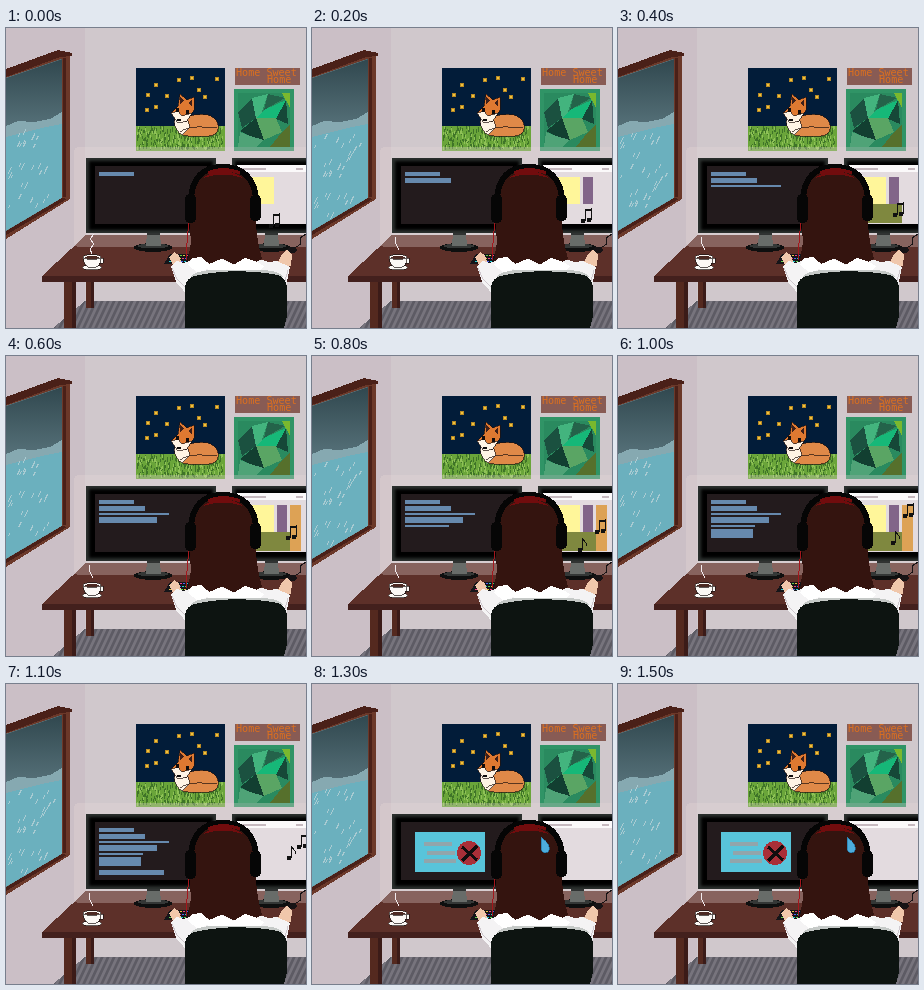
Animation, 300 px wide and 300 px high, one loop 1.52 s. Source, as an HTML page:

```html
<!DOCTYPE html>
<html lang="en">
<head>
<meta charset="utf-8">
<title>Rainy day at the desk</title>
<style>
html, body { margin: 0; width: 100%; height: 100%; overflow: hidden; }
svg { display: block; width: 100vw; height: 100vh; }
text { font: 10.1px "DejaVu Sans Mono", monospace; fill: #dc701f; }
</style>
</head>
<body>
<svg viewBox="0 0 300 300" shape-rendering="crispEdges">
<defs>
  <pattern id="stripes" width="6" height="6" patternUnits="userSpaceOnUse" patternTransform="skewX(-25)">
    <path d="M0 0h6v6H0z" fill="#77747d"/><path d="M0 0h3v6H0z" fill="#5d5b64"/>
  </pattern>
  <linearGradient id="sky" x2="0" y2="1">
    <stop stop-color="#30474e"/><stop offset="1" stop-color="#557078"/>
  </linearGradient>
  <filter id="soft"><feGaussianBlur stdDeviation="1.5"/></filter>
  <clipPath id="glass"><path d="M0 50L56 31V170L0 203z"/></clipPath>
  <g id="monitor">
    <path d="M0 0h130v75H0z" fill="#2b302e"/>
    <path d="M3 3h124v69H3z" fill="#000" filter="url(#soft)"/>
    <path d="M9 8h112v58H9z" fill="#231b1d"/>
  </g>
  <g id="stand">
    <ellipse cx="147" cy="219.500" rx="19" ry="4.500" fill="#0e0f0f"/>
    <ellipse cx="147" cy="218" rx="15" ry="2.500" fill="#343736"/>
    <path d="M141 205h13l1 13h-15z" fill="#686c69"/>
    <path d="M141 205h13v2h-13z" fill="#303332"/>
  </g>
</defs>

<!-- room -->
<path d="M0 0h300v300H0z" fill="#d0c8cc"/>
<path d="M0 0h79v272L47 300H0z" fill="#cbbfc6"/>
<path d="M79 273h221v27H47z" fill="url(#stripes)"/>

<!-- window -->
<path d="M0 41L52 22L66 25L64 29V171L0 211z" fill="#6b3829"/>
<path d="M0 41L52 22L66 25V28L54 29L0 49z" fill="#4a2018"/>
<path d="M57 30h3v139h-3z" fill="#4a2018"/>
<g clip-path="url(#glass)">
  <path d="M0 30h56v174H0z" fill="#6bb0be"/>
  <path d="M0 30h56v66L40 99L20 104L0 109z" fill="#86a9b1"/>
  <path d="M0 30h56v54L44 91L28 94L12 93L0 98z" fill="url(#sky)"/>
  <path id="rain" fill="none" stroke="#a9cbd2"/>
</g>
<path d="M0 203L56 170L61 171L0 207z" fill="#4a2018"/>

<!-- fox picture -->
<path d="M130 40h89v83h-89z" fill="#021c39"/>
<path d="M130 98h89v25h-89z" fill="#6aa53a"/>
<path id="grassDark" stroke="#3f7428"/>
<path id="grassLight" stroke="#8fc257"/>
<g id="flies"></g>
<g stroke="#21130f" stroke-width=".7">
  <path d="M174 98C176 88 190 85 202 87C216 91 215 108 203 108H182C174 108 171 103 174 98z" fill="#df8948"/>
  <path d="M169 88L181 90L184 99L176 107C170 103 167 97 169 88z" fill="#fff4e5"/>
  <path d="M172 78L174 66L181 72L188 69L188 82L181 93L172 94L165 85z" fill="#df7931"/>
  <path d="M165 85L172 83L176 88L186 85L181 93L172 95z" fill="#fff4e5"/>
  <path d="M174 104C184 97 196 99 211 100" fill="none"/>
</g>
<path d="M174 69L178 73L174 76zM186 71V79L183 75z" fill="#402019"/>
<path d="M170 80h3v4h-3zM180 82h3v4h-3zM171 91h4v2h-4z" fill="#100c0d"/>

<!-- sign and poster -->
<path d="M229 40h65v17h-65z" fill="#885b54"/>
<text x="230" y="48">Home Sweet</text><text x="261" y="55">Home</text>
<path d="M228 61h60v62h-60z" fill="#309466"/>
<path d="M232 65h52v54h-52z" fill="#2a8a5f"/>
<path d="M232 84L246 70L250 90L236 100z" fill="#1b5140"/>
<path d="M246 70L262 66L256 84L250 90z" fill="#43b47e"/>
<path d="M262 66L279 70L258 82z" fill="#24634a"/>
<path d="M258 82L280 72L270 91L250 90z" fill="#16b878"/>
<path d="M280 72L282 96L270 91z" fill="#164838"/>
<path d="M234 103L250 90L258 112L244 108z" fill="#123f31"/>
<path d="M250 90H270L276 104L258 112z" fill="#5aa564"/>
<path d="M234 104L244 108L258 112L250 119H232z" fill="#4fa377"/>
<path d="M276 65H284V80z" fill="#7ab82e"/>
<path d="M284 96V119H264L276 104z" fill="#56702c"/>

<!-- desk -->
<path d="M58 252h12v48H58zM80 252h8v28h-8z" fill="#54291f"/>
<path d="M66 252h4v48h-4zM85 252h3v28h-3z" fill="#3b1b18"/>
<path d="M80 207H300V248H36z" fill="#5d3029"/>
<path d="M36 248H300V254H36z" fill="#43201d"/>
<rect x="68" y="119" width="240" height="100" rx="5" fill="#e6d8d8" opacity=".3"/>

<!-- left monitor -->
<use href="#monitor" x="80" y="130"/>
<use href="#stand"/>
<path id="code" fill="#6689ad"/>
<g id="error">
  <path d="M103 148h70v40h-70z" fill="#58c4da"/>
  <path d="M112 158h28v4h-28zM115 167h28v4h-28zM112 175h32v4h-32z" fill="#91a5ab"/>
  <circle cx="157" cy="169" r="12" fill="#a92f38"/>
  <path d="M150 163L165 176M165 162L150 177" stroke="#110d0e" stroke-width="3"/>
</g>

<!-- right monitor -->
<use href="#monitor" x="226" y="130"/>
<use href="#stand" x="118"/>
<path d="M231 137h69v59h-69z" fill="#e3dbdf"/>
<path d="M231 137h69v7h-69z" fill="#fbf9fa"/>
<path d="M234 140h26v2h-26zM290 140h7v2h-7z" fill="#c6b9bf"/>
<g id="art">
  <path d="M250 176h34v19h-34z" fill="#7f883f"/>
  <path d="M245 149h23v27h-23z" fill="#fff69a"/>
  <path d="M271 149h10v27h-10z" fill="#826589"/>
  <path d="M284 149h11v46h-11z" fill="#dda255"/>
</g>
<g id="notes" fill="#111" stroke="#111"></g>

<!-- cup -->
<path id="steam" fill="none" stroke="#f2eaed"/>
<g fill="#fbf8f5" stroke="#1c1513" stroke-width=".7">
  <ellipse cx="86" cy="239.500" rx="10" ry="2.500"/>
  <path d="M94 230h3v5h-4"/>
  <path d="M77 229H95C95 237 91 240 86 240S78 237 77 229z"/>
  <ellipse cx="86" cy="229" rx="9" ry="2.500"/>
</g>
<ellipse cx="86" cy="229.500" rx="7" ry="1.500" fill="#4c2922"/>

<!-- keyboard and mouse -->
<path d="M164 226h20l-3 10h-23z" fill="#151519"/>
<g id="keys"></g>
<path d="M300 206L294 210L295 216L285 222" fill="none" stroke="#171315"/>
<ellipse cx="286" cy="222" rx="5" ry="3" fill="#171315"/>

<!-- person -->
<path d="M163 229l5-5l5 3l2 7l6 8l-10 2zM285 238l1-11l-5-6l-5 5l-6 12z" fill="#f0c7ab"/>
<path d="M165 238L171 233L178 235L190 230H251L262 234L271 233L284 239L281 254L276 270H184L170 254z" fill="#f4f3f4"/>
<path d="M166 240L171 251L180 260M282 242L278 257" fill="none" stroke="#cfc8ce"/>
<path d="M183 190C178 158 193 138 217 138C243 138 255 158 250 192C250 210 254 222 256 231L248 235L239 231L229 237L217 231L204 236L194 229L182 233L185 214z" fill="#34140f"/>
<path d="M186 230l9-1l8 7l12-5l12 6l12-7l12 4l7 4l-6 7l-10-3l-10 5l-9-5l-11 4l-11-5l-9 4l-10-8z" fill="#fff"/>
<path d="M182 194C183 210 179 218 181 232" fill="none" stroke="#a4161c"/>
<path d="M197 150Q217 136 237 150Q217 143 197 150z" fill="#710c0d"/>
<path d="M185 174C185 148 199 139 217 139S250 149 250 174" fill="none" stroke="#050505" stroke-width="6"/>
<path d="M202 145Q217 138 234 145" fill="none" stroke="#710c0d" stroke-width="3"/>
<rect x="179" y="166" width="11" height="29" rx="5" fill="#060606"/>
<rect x="244" y="167" width="11" height="26" rx="5" fill="#060606"/>
<path id="sweat" d="M229 153C234 158 238 160 237 166C235 171 229 169 229 164z" fill="#4daddd" stroke="#237bac" stroke-width=".7"/>
<path d="M184 249Q190 243 204 242H256Q274 243 277 249z" fill="#c5c9c7"/>
<path d="M179 300V261Q179 249 193 247Q230 240 267 246Q281 248 281 261V288L278 300z" fill="#0d1411"/>
</svg>
<script>
const $ = id => document.getElementById(id);
const starts = [0, 200, 400, 600, 800, 900, 1000, 1100, 1300, 1500];
const LOOP = 1520;

function random(seed) {
  return () => (seed = seed * 16807 % 2147483647) / 2147483647;
}

function grass(seed, count) {
  const rnd = random(seed);
  let d = '';
  for (let i = 0; i < count; i++) {
    const x = 131 + Math.floor(rnd() * 86), y = 98 + Math.floor(rnd() * 22);
    d += `M${x} ${y}l1 3`;
  }
  return d;
}

function rainPath(phase) {
  const rnd = random(417);
  let d = '';
  for (let i = 0; i < 34; i++) {
    const x = 4 + rnd() * 46;
    const y = 100 + (rnd() * 90 + phase * 30) % 90;
    const len = 3 + rnd() * 4;
    d += `M${x.toFixed(1)} ${y.toFixed(1)}l${-len / 2} ${len}`;
  }
  return d;
}

const bar = ([y, w, h]) => `M93 ${y}h${w}v${h}h${-w}z`;
const lines = [[144, 35, 4], [150, 46, 5], [157, 70, 2], [161, 58, 6],
               [169, 44, 2], [173, 42, 4], [177, 42, 5], [186, 65, 5]];

// Positions of the first and second note, one per step.
const firstNote = [[268, 192], [274, 187], [280, 181], [285, 176],
                   [288, 170], [289, 162], [290, 154], [296, 157]];
const secondNote = { 4: [269, 188], 5: [272, 185], 6: [276, 181], 7: [284, 168] };

const head = (x, y) => `<ellipse cx="${x}" cy="${y}" rx="2" ry="1.5"/>`;
const note = ([x, y], pair) => `<g transform="translate(${x} ${y})">` + (pair
  ? head(-3, 6) + head(3, 5) + '<path d="M-1 6V-5L5 -6V5M-1 -4L5 -5" fill="none"/>'
  : head(-1, 6) + '<path d="M1 6V-6L5 -1V2" fill="none"/>') + '</g>';

const keyColors = ['#f0418a', '#4f63f2', '#22cdd2', '#5fd04a', '#e8c440'];
const keyRow = shift => Array.from({ length: 18 }, (_, i) => {
  const row = Math.floor(i / 6), x = 165 + i % 6 * 3 - row, y = 227 + row * 3;
  return `<path d="M${x} ${y}h2v1h-2z" fill="${keyColors[(i + shift) % 5]}"/>`;
}).join('');

$('grassDark').setAttribute('d', grass(53, 260));
$('grassLight').setAttribute('d', grass(91, 120));
$('flies').innerHTML = [[150, 57], [161, 68], [142, 67], [150, 79], [141, 82],
  [173, 52], [186, 50], [211, 51], [199, 69], [193, 62]].map(([x, y]) =>
  `<circle cx="${x}" cy="${y}" r="2.5" fill="#b98a25"/><circle cx="${x}" cy="${y}" r="1.4" fill="#f3c23c"/>`
).join('');

function show(step) {
  const failed = step >= 8, drawing = step < 7;
  $('rain').setAttribute('d', rainPath(step % 3));
  $('steam').setAttribute('d', step
    ? 'M83 209L84 216L87 222'
    : 'M88 206L84 211L88 216L84 221L86 226');
  $('code').setAttribute('d', failed ? '' : lines.slice(0, step + 1).map(bar).join(''));
  $('error').style.display = $('sweat').style.display = failed ? '' : 'none';

  // The step at which each part of the drawing appears.
  [2, 0, 1, 3].forEach((first, i) =>
    $('art').children[i].style.display = drawing && step >= first ? '' : 'none');
  $('notes').innerHTML = failed ? '' : note(firstNote[step], true) +
    (secondNote[step] ? note(secondNote[step], false) : '');
  $('keys').innerHTML = keyRow(Math.min(Math.max(step - 1, 0), 6));
}

let current = -1;
function tick() {
  const time = performance.now() % LOOP;
  const step = starts.findLastIndex(start => start <= time);
  if (step !== current) show(current = step);
  requestAnimationFrame(tick);
}
tick();
</script>
</body>
</html>
```
